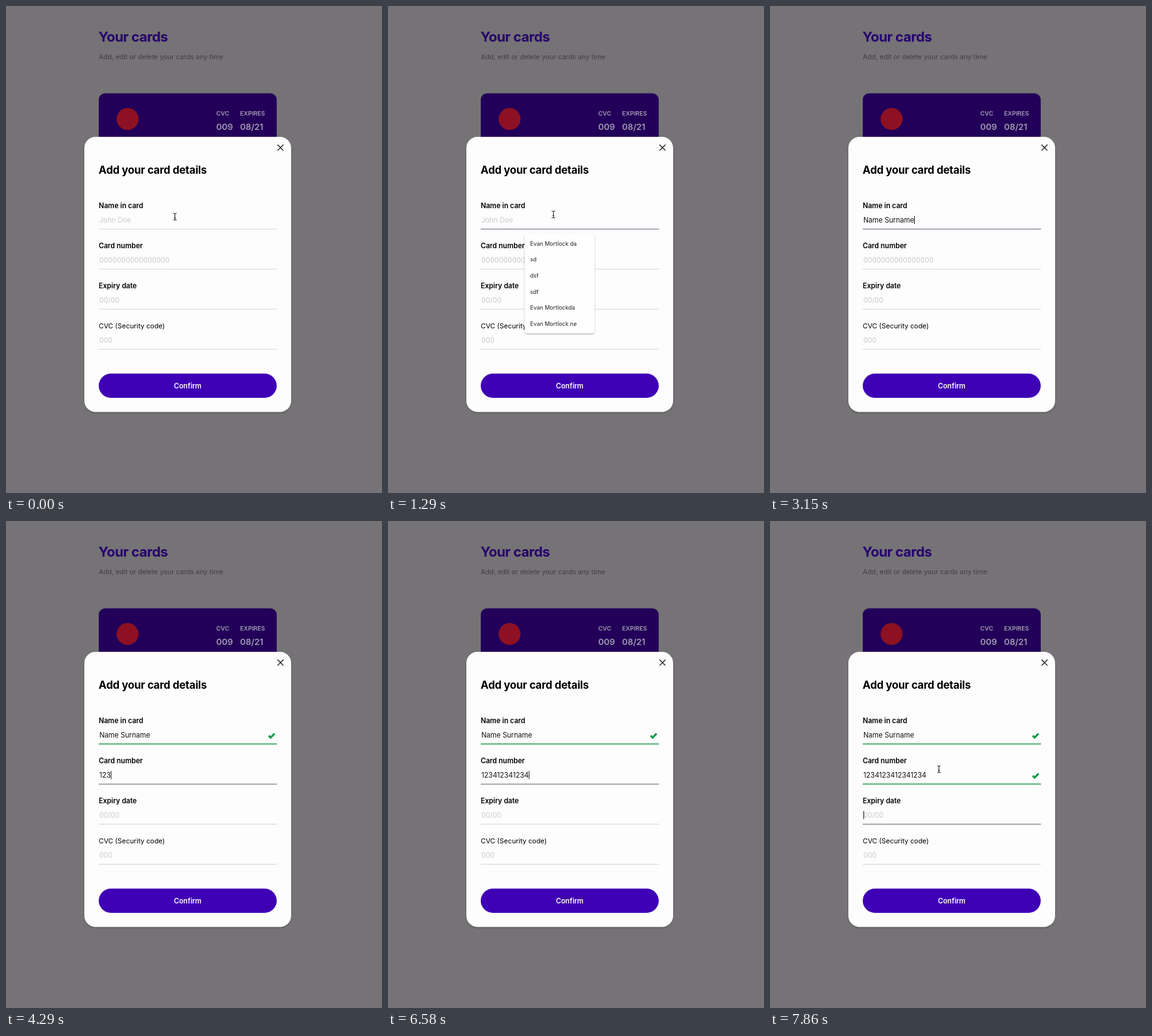
An HTML page that plays this animation: 600 by 778 pixels, repeating every 8 s.

```html
<!DOCTYPE html>
<html lang="en">
<head>
<meta charset="utf-8">
<title>Add your card details</title>
<style>
  html, body { margin: 0; width: 100%; height: 100%; overflow: hidden; background: #757375; }
  svg { display: block; width: 100%; height: 100%; font-family: Inter, Roboto, sans-serif; }
  text { white-space: pre; }
  .label { font-size: 11.15px; font-weight: 600; }
  .label.plain { font-size: 10.9px; font-weight: 400; }
  .value { font-size: 11.1px; fill: #111; }
  .value.hint { fill: #c9c9cb; }
  .option { font-size: 9.05px; fill: #222; }
  .card { fill: #a39bb0; font-weight: 600; }
</style>
</head>
<body>
<svg viewBox="0 0 600 778">
  <defs>
    <filter id="soft" x="-10%" y="-10%" width="120%" height="125%">
      <feDropShadow dx="0" dy="1.2" stdDeviation="1.2" flood-opacity=".32"/>
    </filter>
  </defs>
  <rect width="600" height="778" fill="#757375"/>
  <text x="147.5" y="57" font-size="22" font-weight="700" letter-spacing="-.5" fill="#26006c">Your cards</text>
  <text x="148" y="85" font-size="10.85" fill="#403e46">Add, edit or delete your cards any time</text>

  <rect x="148" y="139.5" width="284" height="160" rx="10" fill="#220059"/>
  <circle cx="194" cy="180.5" r="17.5" fill="#8d1122"/>
  <g class="card">
    <text x="335.5" y="174.7" font-size="9.6">CVC</text>
    <text x="373.5" y="174.7" font-size="9.6">EXPIRES</text>
    <text x="335.5" y="198" font-size="13.6">009</text>
    <text x="373.5" y="198" font-size="13.6">08/21</text>
  </g>

  <rect x="125" y="209" width="330" height="439.5" rx="18" fill="#fefdfe" filter="url(#soft)"/>
  <path d="M433.3 221.5l9.4 9.4m0-9.4l-9.4 9.4" stroke="#111" stroke-width="1.3"/>
  <text x="147.8" y="268" font-size="17" font-weight="700" letter-spacing="-.2">Add your card details</text>
  <g id="fields"></g>
  <rect x="148" y="587.3" width="284" height="38.7" rx="19.35" fill="#3f00b5"/>
  <text x="290" y="611" font-size="11.2" font-weight="600" fill="#fff" text-anchor="middle">Confirm</text>

  <path id="caret" d="M0 -10.5V2.5" stroke="#111"/>
  <g id="menu">
    <rect id="panel" x="218" y="363" width="111.5" rx="4" fill="#fefefe" filter="url(#soft)"/>
    <g id="options"></g>
  </g>
  <path id="pointer" fill="none" stroke="#222" stroke-width="1.1"
        d="M-2.8 -5.5Q0 -5.5 0 -4Q0 -5.5 2.8 -5.5M0 -4V4M-2.8 5.5Q0 5.5 0 4Q0 5.5 2.8 5.5M-1.4 1.8H1.4"/>
</svg>
<script>
const LOOP = 8000, LEFT = 148, GAP = 64;
const $ = id => document.getElementById(id);

function add(parent, tag, attrs, text = '') {
  const el = document.createElementNS('http://www.w3.org/2000/svg', tag);
  for (const key in attrs) el.setAttribute(key, attrs[key]);
  el.textContent = text;
  return parent.appendChild(el);
}
const show = (el, on) => el.setAttribute('visibility', on ? 'visible' : 'hidden');

// keys: the time at which each further character appears
const fields = [
  { label: 'Name in card', hint: 'John Doe', text: 'Name Surname', focus: 720, done: 3580,
    keys: [1580, 1720, 1790, 1860, 2000, 2290, 2580, 2720, 2860, 3000, 3080, 3150] },
  { label: 'Card number', hint: '0'.repeat(16), text: '1234'.repeat(4), focus: 3580, done: 7580,
    keys: [3860, 4150, 4290, 4580, 4860, 5000, 5290, 5580, 5860, 6150, 6290, 6580, 6720, 6860, 7150, 7290] },
  { label: 'Expiry date', hint: '00/00', text: '', focus: 7580, done: Infinity, keys: [] },
  { label: 'CVC (Security code)', hint: '000', text: '', focus: Infinity, done: Infinity, keys: [], plain: true }
];
const names = ['Evan Mortlock da', 'sd', 'dsf', 'sdf', 'Evan Mortlockda', 'Evan Mortlock ne'];
const path = [[0, 269.5, 336.5], [150, 269, 337], [290, 268, 336], [580, 265, 334], [720, 264, 333],
              [7720, 268, 380], [7860, 269.5, 396.5]];

fields.forEach((f, i) => {
  const y = 323 + i * GAP;
  add($('fields'), 'text', { x: LEFT, y, class: f.plain ? 'label plain' : 'label' }, f.label);
  f.value = add($('fields'), 'text', { x: LEFT + 1, y: y + 22.8 });
  f.line = add($('fields'), 'path', { d: `M${LEFT} ${y + 33.3}h284.5` });
  f.tick = add($('fields'), 'path', {
    d: `M419.2 ${y + 20}l3.1 3 6.2 -6.4`, fill: 'none', stroke: '#0d9a48', 'stroke-width': 3.2
  });
});
const options = names.map((name, i) =>
  add($('options'), 'text', { x: 226.7, y: 382.7 + i * 25.6, class: 'option' }, name));

function drawField(f, t) {
  const typed = f.keys.filter(k => k <= t).length;
  const done = t >= f.done, active = t >= f.focus && !done;
  f.value.textContent = typed ? f.text.slice(0, typed) : f.hint;
  f.value.setAttribute('class', typed ? 'value' : 'value hint');
  f.line.setAttribute('stroke', done ? '#1c9e4e' : active ? '#74808a' : '#d0cfd1');
  f.line.setAttribute('stroke-width', done ? 1.5 : active ? 1.2 : 1);
  show(f.tick, done);
  return typed;
}

function drawCaret(t) {
  const i = fields.findIndex(f => t >= f.focus && t < f.done);
  if (i < 0) return show($('caret'), false);
  const f = fields[i];
  const last = Math.max(f.focus, ...f.keys.filter(k => k <= t));
  const typed = f.keys.some(k => k <= t);
  const x = LEFT + 1.6 + (typed ? f.value.getComputedTextLength() : 0);
  $('caret').setAttribute('transform', `translate(${x} ${345.8 + i * GAP})`);
  show($('caret'), (t - last) % 1000 < 500);
}

function drawMenu(t, typed) {
  const open = t >= 860 && t < 3150, count = typed ? 1 : names.length;
  $('menu').setAttribute('display', open ? 'inline' : 'none');
  $('panel').setAttribute('height', 32 + (count - 1) * 25.6);
  options.forEach((o, i) => show(o, i < count));
  options[0].textContent = typed ? fields[0].text : names[0];
}

function draw(t) {
  const typed = fields.map(f => drawField(f, t));
  drawCaret(t);
  drawMenu(t, typed[0]);
  const [, x, y] = path.filter(p => p[0] <= t).pop();
  $('pointer').setAttribute('transform', `translate(${x} ${y})`);
  show($('pointer'), t < 1580 || t >= 7720);
}

const start = performance.now();
function tick() {
  draw((performance.now() - start) % LOOP);
  requestAnimationFrame(tick);
}
draw(0);
requestAnimationFrame(tick);
</script>
</body>
</html>
```
